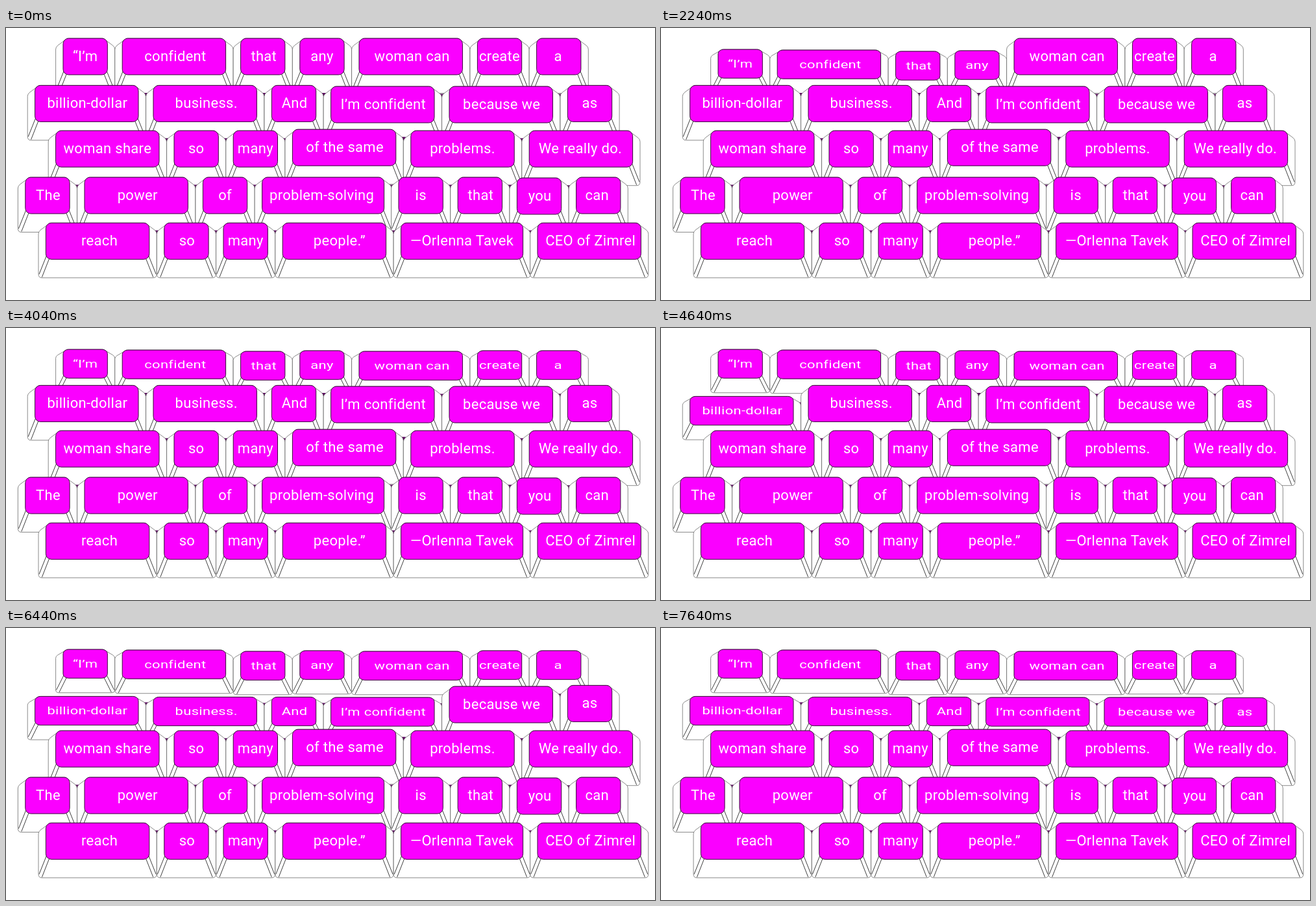
Write an HTML page that moves like this. It is 1000x419 px and loops after 8000 ms.

```html
<!DOCTYPE html>
<html lang="en">
<head>
<meta charset="utf-8">
<title>Keyboard quote</title>
<style>
  html, body { margin: 0; width: 100%; height: 100%; overflow: hidden; background: #fff; }
  svg { display: block; width: 100%; height: 100%; }
  path, rect { vector-effect: non-scaling-stroke; }
  .body { fill: #fff; stroke: #5a5a5a; stroke-width: .7; }
  .edge { fill: none; stroke: #2a2a2a; stroke-width: .9; }
  .notch { fill: #5c0a60; }
  .face { fill: #fa00ff; stroke: #38073a; stroke-width: 1; }
  text { fill: #fff; font: 400 22px Roboto, "Open Sans", sans-serif; letter-spacing: .3px; text-anchor: middle; }
</style>
</head>
<body>
<svg id="stage" viewBox="0 0 1000 419"></svg>
<script>
const LOOP = 8000, FIRST = 440, STEP = 600, SQUASH = 0.79;
const HEIGHT = 84.5, FACE = 56, SIDE = 11.4;

// key size: [face width, distance to the next key]
const SIZES = { s: [68.3, 91.2], m: [159.4, 182.4], l: [188, 210.4] };

// each key: [label, size, label shift, key shift down]
const ROWS = [
  { x: 88, y: 16, keys: [
    ["“I’m", "s", 0], ["confident", "m", 2], ["that", "s", 1.5], ["any", "s", 0],
    ["woman can", "m", 2], ["create", "s", 0], ["a", "s", -1]] },
  { x: 44.6, y: 88.4, keys: [
    ["billion-dollar", "m", 1], ["business.", "m", 2], ["And", "s", 1],
    ["I’m confident", "m", 1, 1.6], ["because we", "m", 1, 1.6], ["as", "s", 0]] },
  { x: 76.6, y: 158.2, keys: [
    ["woman share", "m", 0], ["so", "s", 0], ["many", "s", 0],
    ["of the same", "m", 1, -2], ["problems.", "m", 0], ["We really do.", "m", -1]] },
  { x: 29.8, y: 230, keys: [
    ["The", "s", 1], ["power", "m", 2], ["of", "s", 0], ["problem-solving", "l", -2],
    ["is", "s", 0], ["that", "s", 1], ["you", "s", 1, 1], ["can", "s", -2]] },
  { x: 61.4, y: 300.3, keys: [
    ["reach", "m", 3], ["so", "s", 1], ["many", "s", 0], ["people.”", "m", 8],
    ["—Orlenna Tavek", "l", 0], ["CEO of Zimrel", "m", 2]] }
];

// how far the face top drops, in order of typing
const DROPS = [17, 18, 20, 19, 20, 19, 19, 17, 18, 18, 17, 17, 19];

function add(parent, tag, attrs) {
  const el = document.createElementNS("http://www.w3.org/2000/svg", tag);
  for (const name in attrs) el.setAttribute(name, attrs[name]);
  return parent.appendChild(el);
}

function bodyPath(w) {
  const l = -SIDE, r = w + SIDE, h = HEIGHT;
  return `M6.5 0H${w - 6.5}L${r - 3} 11Q${r} 13.5 ${r} 17` +
    `V${h - 6}Q${r} ${h} ${r - 5} ${h}H${l + 5}Q${l} ${h} ${l} ${h - 6}` +
    `V17Q${l} 13.5 ${l + 3} 11Z`;
}

function edgePath(w) {
  return `M.8 51L${1 - SIDE} 79M5 55.5L-6 83.5` +
    `M${w - 0.8} 51L${w + SIDE - 1} 79M${w - 5} 55.5L${w + 6} 83.5`;
}

function drawKey(x, y, w, label, shift, notched) {
  const place = add(stage, "g", { transform: `translate(${x} ${y})` });
  const key = add(place, "g", {});
  if (notched) add(key, "path", { class: "notch", d: `M${w + SIDE - 4} 11.5h8l-4 6z` });
  add(key, "path", { class: "body", d: bodyPath(w) });
  add(key, "path", { class: "edge", d: edgePath(w) });
  add(key, "rect", { class: "face", width: w, height: FACE, rx: 8.5 });
  add(key, "text", { x: w / 2 + shift, y: 35 }).textContent = label;
  return key;
}

function press(key, time, drop) {
  const up = "translate(0px, 0px) scale(1, 1)";
  const down = `translate(0px, ${drop}px) scale(1, ${SQUASH})`;
  const at = time / LOOP;
  key.animate([
    { transform: up, offset: 0 }, { transform: up, offset: at },
    { transform: down, offset: at }, { transform: down, offset: 1 }
  ], { duration: LOOP, iterations: Infinity });
}

const stage = document.getElementById("stage");
const keys = [];
ROWS.forEach((row, n) => {
  let x = row.x;
  row.keys.forEach(([label, size, shift, dy = 0], i) => {
    const [w, pitch] = SIZES[size];
    const notched = n > 0 && i < row.keys.length - 1;
    keys.push(drawKey(x, row.y + dy, w, label, shift, notched));
    x += pitch;
  });
});
DROPS.forEach((drop, i) => press(keys[i], FIRST + i * STEP, drop));
</script>
</body>
</html>
```
